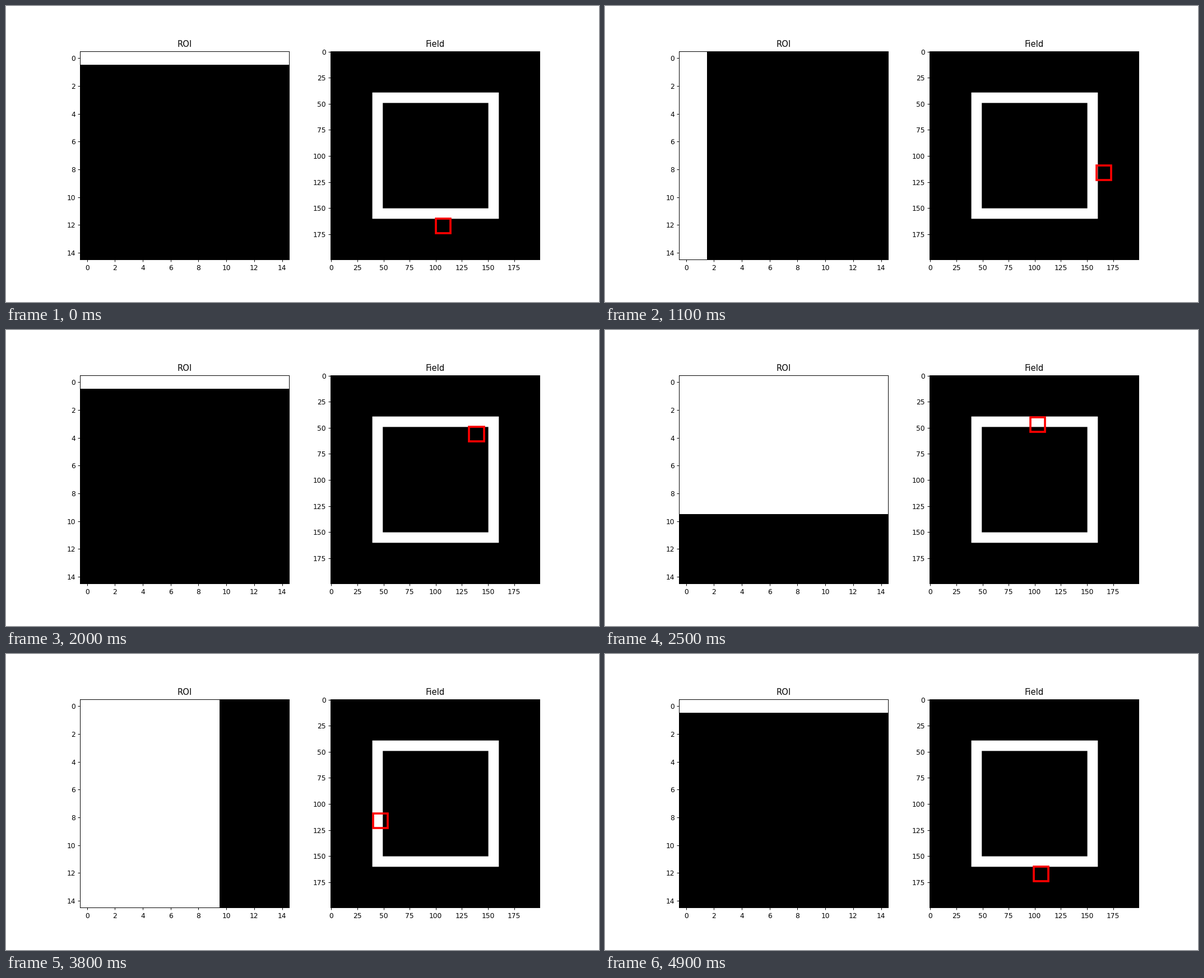
Animation, 1058 px wide and 529 px high, one loop 5 s. Source, as a matplotlib script:

```python
import numpy as np
import matplotlib.pyplot as plt
from matplotlib.animation import FuncAnimation
from matplotlib.patches import Rectangle

FRAMES = 50
ROI = 15       # window side in pixels
CENTER = 100
RADIUS = 60

# White square frame on a black field
field = np.zeros((200, 200))
field[40:161, 40:161] = 1
field[50:151, 50:151] = 0

angles = np.linspace(0, 2 * np.pi, FRAMES)


def corner(i):
    """Top-left pixel of the window, moving around a circle."""
    x = int(CENTER + RADIUS * np.sin(angles[i]))
    y = int(CENTER + RADIUS * np.cos(angles[i]))
    return x, y


def crop(x, y):
    return field[y:y + ROI, x:x + ROI]


plt.rcParams["font.family"] = "DejaVu Sans"
fig, (ax_roi, ax_field) = plt.subplots(1, 2, figsize=(12, 6), dpi=1058 / 12)

start = corner(0)
roi_img = ax_roi.imshow(crop(*start), cmap="gray", vmin=0, vmax=1)
ax_roi.set_title("ROI")

ax_field.imshow(field, cmap="gray", vmin=0, vmax=1)
ax_field.set_title("Field")
box = Rectangle(start, ROI - 1, ROI - 1, fill=False, edgecolor="red", linewidth=3)
ax_field.add_patch(box)


def update(i):
    x, y = corner(i)
    roi_img.set_data(crop(x, y))
    box.set_xy((x, y))
    return roi_img, box


anim = FuncAnimation(fig, update, frames=FRAMES, interval=100, repeat=True, repeat_delay=0)
plt.show()
```
